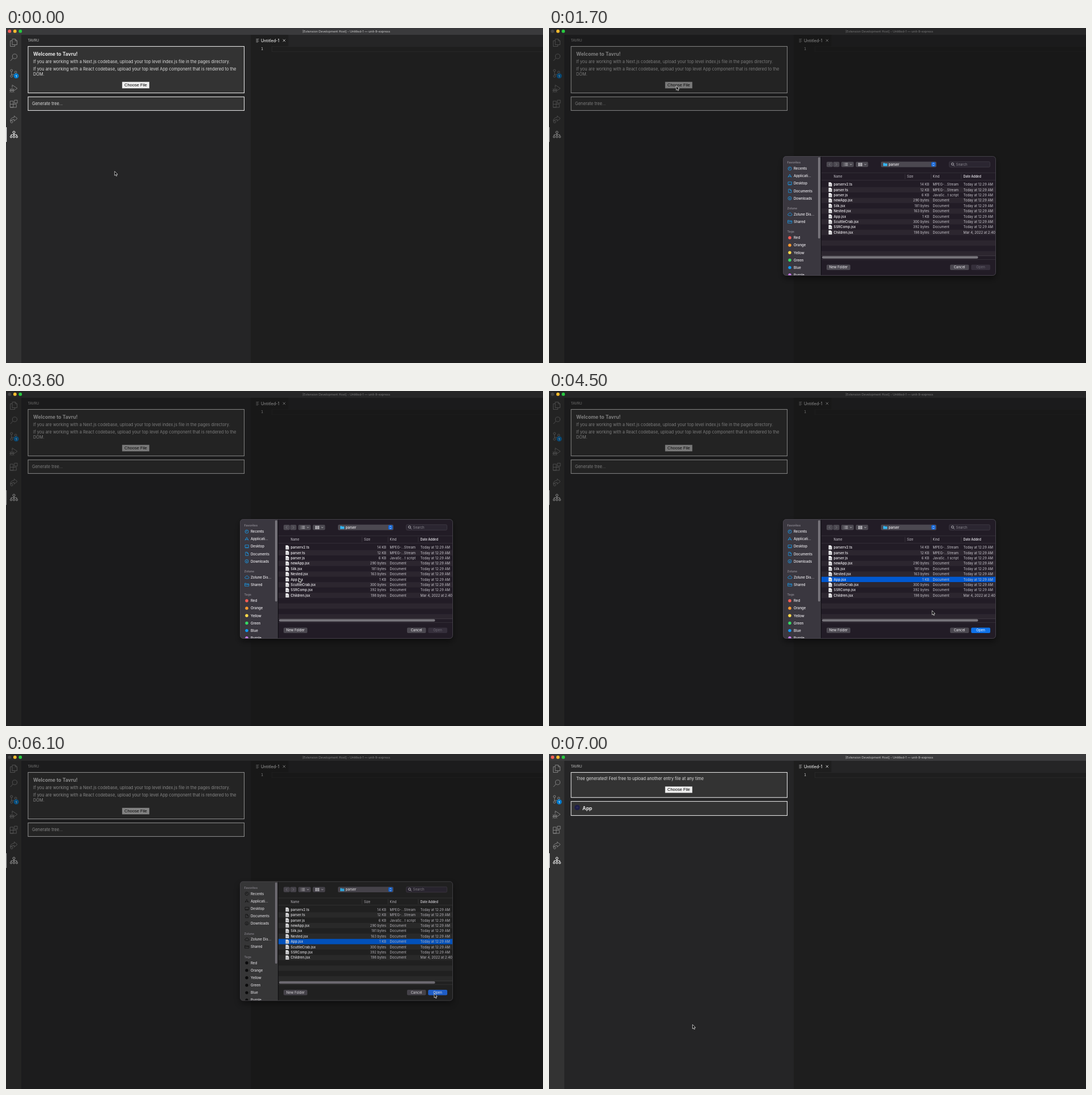
Animation of 948 by 591 pixels, one loop 8320 ms. Source, as an HTML page:

```html
<!DOCTYPE html>
<html lang="en">
<head>
<meta charset="utf-8">
<title>Component tree walkthrough</title>
<style>
  html, body { margin: 0; width: 100%; height: 100%; overflow: hidden; background: #1e1e1e; }
  svg { display: block; width: 100vw; height: 100vh; }
  text { font-family: Inter, sans-serif; white-space: pre; }
  .icon { fill: none; stroke: #858585; stroke-width: .95; }
  .side { fill: none; stroke: #1a9bea; stroke-width: .8; }
  .card { fill: #333; stroke: #e2e2e2; stroke-width: 1.1; }
  .glyph { fill: none; stroke: #d5d3d8; stroke-width: .8; }
  #back { fill: #221d28; }
  #aside { fill: #3a373f; }
  .off #back { fill: #222223; }
  .off #aside { fill: #3a3a3b; }
  .off .side { stroke: #111; }
  .off .tag { fill: #0a0a0a; }
</style>
</head>
<body>
<svg id="stage" viewBox="0 0 948 591" preserveAspectRatio="none"></svg>
<script>
const LOOP = 8320, STEP = 100;
const stage = document.getElementById('stage');

const text = (x, y, s, size, fill = '#dcdcdc', extra = '') =>
  `<text x="${x}" y="${y}" font-size="${size}" fill="${fill}" ${extra}>${s}</text>`;
const rect = (x, y, w, h, fill, extra = '') =>
  `<rect x="${x}" y="${y}" width="${w}" height="${h}" fill="${fill}" ${extra}/>`;
const dot = (x, y, r, fill, extra = '') =>
  `<circle cx="${x}" cy="${y}" r="${r}" fill="${fill}" ${extra}/>`;
const path = (d, cls, extra = '') => `<path class="${cls}" d="${d}" ${extra}/>`;
const card = (y, h) => `<rect class="card" x="39" y="${y}" width="381.5" height="${h}"/>`;
const MIDDLE = 'text-anchor="middle"', END = 'text-anchor="end"', BOLD = 'font-weight="700"';

const chooseButton = (y, id) =>
  rect(205, y, 48, 11.4, '#efefef', `id="${id}" stroke="#777" stroke-width=".4"`) +
  text(229, y + 8.1, 'Choose File', 7.5, '#000', MIDDLE + ' style="font-family:\'Liberation Sans\',Arial,sans-serif"');

function activityBar() {
  const icons = [
    'M11 19.5h5.5l3 3v7H11zM16.3 19.5v3.2h3.2M11 22.5H7.6V32.5H15.6V29.5',
    'M19.5 50a4.1 4.1 0 1 1-8.2 0a4.1 4.1 0 1 1 8.2 0M12.4 53L7.8 58',
    'M11.6 75a1.9 1.9 0 1 1-3.8 0a1.9 1.9 0 1 1 3.8 0M11.6 85a1.9 1.9 0 1 1-3.8 0a1.9 1.9 0 1 1 3.8 0M19 78a1.9 1.9 0 1 1-3.8 0a1.9 1.9 0 1 1 3.8 0M9.7 77v6M17 80q0 2-3 2h-4',
    'M11 105V100.5L20 106.5L14 110.5M8 108.5q2.5-3.5 5 0v3q-2.5 3.5-5 0zM6.5 107.5l1.5 1M14.5 107.5l-1.5 1M6 110.5h8.6M6.7 113.5l1.5-1.2M14.3 113.5l-1.5-1.2M8 109h5',
    'M7.3 129h5.5v11H7.3zM7.3 134.5h11v5.5h-11M14.8 127.3h5.2v5.2h-5.2z',
    'M14.5 155l5.5 4.6l-5.5 4.6v-2.8q-4.5-.4-7 2.6q.5-6 7-6.4zM12 165.5a2 2 0 1 1-4 0a2 2 0 1 1 4 0'
  ];
  const tree = 'M14 185.6v5M9 190.2v-2h10v2M16 184a2 2 0 1 1-4 0a2 2 0 1 1 4 0' +
    [9, 14, 19].map(x => `M${x + 1.6} 192a1.6 1.6 0 1 1-3.2 0a1.6 1.6 0 1 1 3.2 0`).join('');
  return rect(0, 12, 27, 579, '#333') +
    icons.map(d => path(d, 'icon')).join('') +
    path(tree, 'icon', 'style="stroke:#fff"') +
    rect(0, 175, 1.2, 26, '#fff') +
    dot(18, 84.5, 4.6, '#007acc') + text(18, 86.6, '1', 5.4, '#fff', MIDDLE + ' font-weight="600"');
}

function editor() {
  return rect(432, 12, 516, 20, '#252526') + rect(432, 12, 66.5, 20, '#1e1e1e') +
    path('M441.5 19.5h5M441.5 21.3h3.6M441.5 23.1h5M441.5 24.9h3.6', 'icon', 'style="stroke:#b5b5b5;stroke-width:.7"') +
    text(450, 24.7, 'Untitled-1', 7.2, '#fff') +
    path('M488.8 19.8l4.4 4.4M493.2 19.8l-4.4 4.4', 'icon', 'style="stroke:#ddd;stroke-width:.8"') +
    rect(469.5, 32.6, 490, 9, 'none', 'stroke="#2a2a2a" stroke-width=".9"') +
    text(450, 39.3, '1', 6.8, '#c6c6c6', 'style="font-family:\'DejaVu Sans Mono\',monospace"');
}

function panel() {
  const welcome =
    card(32.5, 82) +
    text(48, 49.2, 'Welcome to Tavru!', 8.6, '#e4e4e4', BOLD) +
    text(48, 61.5, 'If you are working with a Next.js codebase, upload your top level index.js file in the pages directory.', 7.4) +
    text(48, 74.6, 'If you are working with a React codebase, upload your top level App component that is rendered to the', 7.4) +
    text(48, 84, 'DOM.', 7.4) +
    chooseButton(95, 'choose') +
    card(121.5, 24) +
    text(46, 136.1, 'Generate tree...', 7.4);
  const done =
    card(32.5, 44.2) +
    text(48, 46.1, 'Tree generated! Feel free to upload another entry file at any time', 7.4) +
    chooseButton(57.2, 'again') +
    card(83.6, 24.9) +
    dot(49.8, 94.4, 4.7, '#1d1d48') +
    path('M47.8 94.4h4M49.8 92.4v4', 'icon', 'style="stroke:#34345c"') +
    text(59, 99.2, 'App', 8.6, '#e4e4e4', BOLD);
  return text(38.4, 24.4, 'TAVRU', 6.1, '#c4c4c4') +
    `<g id="welcome">${welcome}</g><g id="done">${done}</g>`;
}

function sidebar() {
  const head = (y, s) => text(420.5, y, s, 5.3, '#8b8890', 'font-weight="600"');
  const item = (y, s) => text(432, y + 2.2, s, 6.05, '#efedf1', 'font-weight="500"');
  const places = [
    [248, 'Recents', 'M428 0a3 3 0 1 1-6 0a3 3 0 1 1 6 0M425-2V0H423.4'],
    [261.1, 'Applicati…', 'M422 2.5L425-3L428 2.5M422 .8h6'],
    [274.2, 'Desktop', 'M422-2.5h6.4v4.2H422zM422 2.6h6.4'],
    [287.3, 'Documents', 'M422.8-3h3l2 2v4h-5zM425.6-3v2.2h2.2'],
    [300.4, 'Downloads', 'M428 0a3 3 0 1 1-6 0a3 3 0 1 1 6 0M425-1.6V1.4M423.8.3L425 1.5L426.2.3'],
    [328.5, 'Zolune Dis…', 'M423.2 2.4q-2-.6-1.4-2.4q.4-1 1.6-1q.8-2.2 3-1.4q1 .5 1.1 1.6q2 .4 1.4 2.2q-.4 1-1.4 1z'],
    [341.7, 'Shared', 'M421.6-2.4h2.4l.8.9h4v4h-7.2zM421.6-.4h7.2']
  ];
  const tags = { Red: '#ff5b54', Orange: '#ff9a2e', Yellow: '#ffd84a', Green: '#36d964', Blue: '#1098f7', Purple: '#cb7bf0' };
  return head(239.4, 'Favorites') + head(320.1, 'Zolune') + head(361.4, 'Tags') +
    places.map(([y, s, d]) => item(y, s) + path(d, 'side', `transform="translate(0 ${y})"`)).join('') +
    Object.entries(tags).map(([s, c], i) => {
      const y = 370 + 13.15 * i;
      return item(y, s) + dot(425, y, 2.7, c, 'class="tag"');
    }).join('') +
    rect(475, 228, 3.8, 143.5, '#77747b', 'rx="1.9"');
}

function fileList() {
  const files = [
    ['parserv2.ts', '14 KB', 'MPEG-…Stream'], ['parser.ts', '12 KB', 'MPEG-…Stream'],
    ['parser.js', '6 KB', 'JavaSc…t script'], ['newApp.jsx', '290 bytes'], ['Silk.jsx', '181 bytes'],
    ['Nested.jsx', '163 bytes'], ['App.jsx', '1 KB'], ['ScuttleCrab.jsx', '300 bytes'],
    ['SSRComp.jsx', '392 bytes'], ['Children.jsx', '198 bytes']
  ];
  const top = i => 271.3 + 9.4 * i;
  let out = '';
  for (let i = 1; i < 14; i += 2) out += rect(481, top(i), 307.5, 9.4, '#fff', 'opacity=".045"');
  out += rect(481, top(6), 307.5, 9.4, '#0058d0', 'id="pick"');
  files.forEach(([name, size, kind = 'Document'], i) => {
    const y = top(i) + 6.9, soft = '#c9c6cd';
    out += path(`M493.6 ${y - 5.9}h3.8l2.1 2.1v5.2h-5.9z`, '', 'fill="#f2f2f4"') +
      path(`M494.8 ${y - 2}h3.4M494.8 ${y - .5}h3.4`, 'glyph', 'style="stroke:#8d8d93;stroke-width:.6"') +
      text(502.5, y, name, 6.05, '#f3f1f5', 'font-weight="500"') +
      text(671.2, y, size, 6, soft, END) +
      text(677.6, y, kind, 6, soft) +
      text(731.5, y, i < 9 ? 'Today at 12:29 AM' : 'Mar 4, 2022 at 2:40 PM', 6, soft);
  });
  return out;
}

function dialog() {
  const line = (x, y, w, h) => rect(x, y, w, h, '#fff', 'opacity=".13"');
  const pill = (x, y, w, h, fill = '#4b4850', extra = '') => rect(x, y, w, h, fill, `rx="2" ${extra}`);
  const label = (x, s, extra = '') => text(x, 264, s, 5.5, '#c9c6cd', extra);
  return rect(413.5, 226.5, 375, 210, '#222', 'id="back" rx="5" filter="url(#shadow)"') +
    `<g clip-path="url(#frame)">` +
    rect(413, 226, 67, 211, '#3a373f', 'id="aside"') + rect(480, 226, .8, 211, '#0d0c0f') +
    sidebar() +
    pill(490, 236, 11, 9.2) + pill(501.6, 236, 11, 9.2) +
    path('M496.4 238.4l-1.9 2.2l1.9 2.2M506.2 238.4l1.9 2.2l-1.9 2.2', 'glyph', 'style="stroke:#85828a"') +
    pill(516, 236, 22, 9.2) + pill(541.6, 236, 21.8, 9.2) +
    path('M520.5 238.6h1M520.5 240.6h1M520.5 242.6h1M522.6 238.6h5M522.6 240.6h5M522.6 242.6h5M531.4 239.8l1.6 1.6l1.6-1.6M556.8 239.8l1.6 1.6l1.6-1.6', 'glyph') +
    path('M546 238.7h7M546 240.7h7M546 242.7h7', 'glyph', 'style="stroke-width:1.5;stroke-dasharray:2 .5"') +
    pill(586, 235.8, 98, 9.6) +
    path('M590 238.2h2.6l.8.8h3.8v4.6H590z', '', 'fill="#35b3ee"') +
    text(599.5, 242.7, 'parser', 6.05, '#f3f1f5', 'font-weight="500"') +
    pill(675, 236.6, 7.4, 8, '#1265d8') +
    path('M677.2 239.8l1.5-1.5l1.5 1.5M677.2 241.6l1.5 1.5l1.5-1.5', 'glyph', 'style="stroke:#fff"') +
    pill(706.5, 235.8, 72, 9.6, '#2b2631', 'stroke="#48444e" stroke-width=".6"') +
    path('M714.4 240a2 2 0 1 1-4 0a2 2 0 1 1 4 0M713.8 241.6l2 2', 'glyph') +
    text(718.5, 242.7, 'Search', 6.05, '#8d8a92') +
    line(481, 255.2, 308, .6) + line(481, 268, 308, .6) +
    [628, 674, 727.5].map(x => line(x, 257.5, .7, 9)).join('') +
    label(502.5, 'Name') + label(632, 'Size') + label(677.6, 'Kind') + label(731.5, 'Date Added', BOLD) +
    fileList() +
    line(481, 401.4, 308, .5) + line(481, 408, 308, .6) +
    rect(482, 402.6, 275.5, 4.2, '#77747b', 'rx="2.1"') +
    pill(490, 417.6, 42, 9.4) + text(511, 424.4, 'New Folder', 6.05, '#efedf1', MIDDLE) +
    pill(708, 417.6, 33.4, 9.4) + text(724.6, 424.4, 'Cancel', 6.05, '#efedf1', MIDDLE) +
    pill(745.2, 417.6, 33.8, 9.4, '#352f3b', 'id="open"') + text(762, 424.4, 'Open', 6.05, '#6d6974', MIDDLE + ' id="openLabel"') +
    `</g>` +
    rect(413.5, 226.5, 375, 210, 'none', 'rx="5" stroke="#56535b" stroke-width=".7"');
}

stage.innerHTML =
  `<defs>
    <clipPath id="frame"><rect x="413.5" y="226.5" width="375" height="210" rx="5"/></clipPath>
    <filter id="shadow" x="-10%" y="-15%" width="120%" height="135%"><feDropShadow dx="0" dy="5" stdDeviation="6" flood-opacity=".5"/></filter>
  </defs>` +
  rect(0, 0, 948, 591, '#1e1e1e') + rect(0, 0, 948, 12, '#3a3a3c') +
  text(600.7, 7.6, '[Extension Development Host] - Untitled-1 — unit-9-express', 5.45, '#d0d0d0', MIDDLE) +
  rect(27, 12, 405, 579, '#252526') + activityBar() + panel() + editor() +
  rect(0, 0, 948, 591, '#111', 'id="dim"') +
  dot(6.3, 5.7, 2.9, '#ff5f57', 'id="red"') + dot(15.8, 5.7, 2.9, '#febc2e') + dot(25.3, 5.7, 2.9, '#28c840') +
  `<g id="dialog">${dialog()}</g>` +
  `<path id="cursor" d="M0 0V7.4L1.7 5.9L2.8 8.5L4.1 7.9L3 5.4H5.2Z" fill="#000" stroke="#fff" stroke-width=".7"/>`;

const part = {};
for (const el of stage.querySelectorAll('[id]')) part[el.id] = el;
const set = (id, name, value) => part[id].setAttribute(name, value);
const show = (id, on) => { part[id].style.display = on ? '' : 'none'; };

const progress = (t, a, b) => Math.min(1, Math.max(0, (t - a) / (b - a)));
const smooth = u => u * u * (3 - 2 * u);

// Pointer moves: start, end, x, y
const start = [191.8, 252.8];
const moves = [
  [0, 900, 226, 104.5], [900, 1100, 224.7, 102.2], [1800, 3200, 508, 321], [3200, 3600, 517, 330],
  [4000, 4800, 750, 414], [4800, 5200, 756.3, 422.4], [5500, 5700, 756, 422.6],
  [6100, 6900, 255, 477.3], [6900, 7000, 253.4, 477.3]
];

function pointer(t) {
  let [x, y] = start;
  for (const [a, b, tx, ty] of moves) {
    const k = smooth(progress(t, a, b));
    x += (tx - x) * k;
    y += (ty - y) * k;
  }
  return `translate(${x.toFixed(2)} ${y.toFixed(2)})`;
}

function draw(ms) {
  const t = Math.floor(ms / STEP) * STEP;
  const opening = progress(t, 1400, 1700), closing = progress(t, 6000, 6300);
  const lag = (1 - opening) ** 2, leave = closing ** 2;
  const dim = opening ** 2 * (1 - leave);
  const picked = t >= 4000;

  set('dim', 'opacity', .48 * dim);
  set('red', 'fill', dim > .3 ? '#444446' : '#ff5f57');
  set('choose', 'fill', t >= 1300 ? '#d8d8d8' : t >= 900 ? '#e5e5e5' : '#efefef');
  show('welcome', t < 6400);
  show('done', t >= 6400);

  show('dialog', opening > 0 && closing < 1);
  set('dialog', 'opacity', (1 - lag) * (1 - leave));
  set('dialog', 'transform', `translate(0 ${-29 * lag - 13.5 * leave})`);
  set('dialog', 'class', closing > 0 ? 'off' : '');
  show('pick', picked);
  set('open', 'fill', t >= 5900 ? '#1f66dc' : picked ? '#0f72e8' : '#352f3b');
  set('openLabel', 'fill', picked ? '#fff' : '#6d6974');

  set('cursor', 'transform', pointer(t));
}

const origin = performance.now();
function tick() {
  draw((performance.now() - origin) % LOOP);
  requestAnimationFrame(tick);
}
tick();
</script>
</body>
</html>
```
